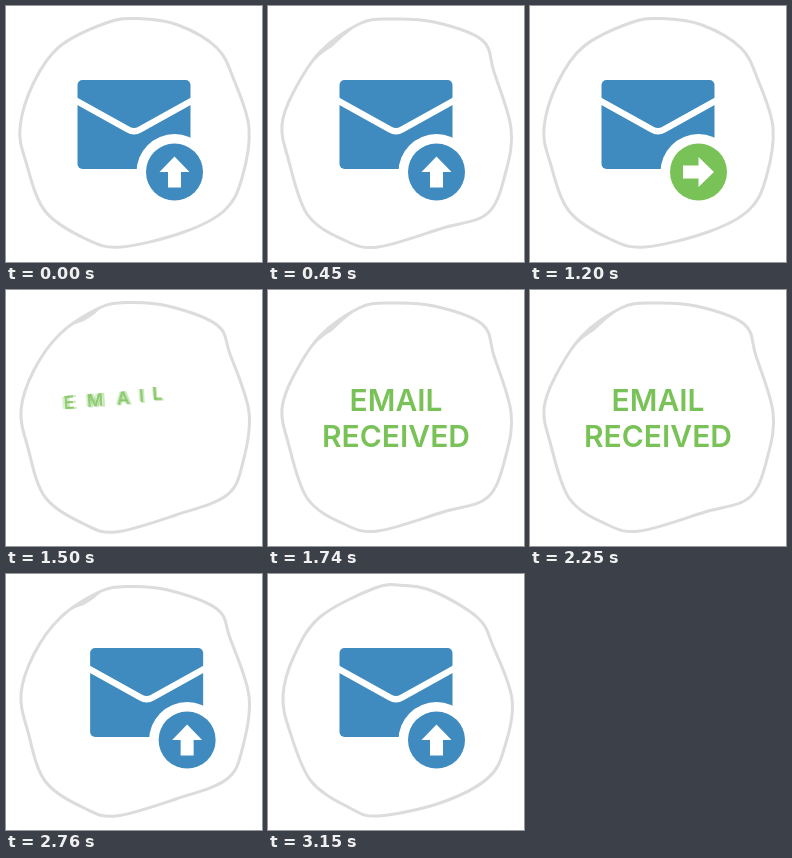
An HTML page that plays this animation: 256 px wide and 256 px high, repeating every 3270 ms.

```html
<!DOCTYPE html>
<html lang="en">
<head>
<meta charset="utf-8">
<title>Email received</title>
<style>
  html, body { margin: 0; width: 100%; height: 100%; overflow: hidden; background: #fff; }
  svg { display: block; width: 100%; height: 100%; }
  text { font: 600 30px Inter, Arial, sans-serif; fill: #79c257; text-anchor: middle; }
</style>
</head>
<body>
<svg id="stage" viewBox="0 0 256 256">
  <mask id="cutout" maskUnits="userSpaceOnUse" x="60" y="60" width="140" height="140">
    <rect x="71.5" y="74" width="113" height="89" rx="5" fill="#fff"/>
    <path d="M68 93.5L122 123.5Q128 127 134 123.5L188 93.5" fill="none" stroke="#000" stroke-width="6.5"/>
    <circle cx="168.5" cy="166" r="38"/>
  </mask>
  <path id="outline" fill="none" stroke="#dcdcdc" stroke-width="3"/>
  <path id="swell" fill="#dcdcdc"/>
  <g id="envelope">
    <rect x="60" y="60" width="140" height="140" fill="#3f8bbf" mask="url(#cutout)"/>
    <circle id="badge" cx="168.5" cy="166" r="28.5"/>
    <path id="arrow" d="M168.5 150.5L183.5 166H175V181.5H162V166H153.5Z" fill="#fff"/>
  </g>
  <g id="words"></g>
</svg>
<script>
const LOOP = 3270, STEP = 30, WOBBLE = 150;
const BLUE = [63, 139, 191], GREEN = [121, 194, 87];
const $ = id => document.getElementById(id);

// Four hand-drawn rings, shown in turn
const rings = [
  [14,122, 27,78, 53,41, 100,17, 132,12.5, 172,19, 211,42, 228,74, 243,122, 236,172, 219,204, 178,226, 115,241, 80,233, 39,205, 20,156],
  [15,122, 26,82, 52,43, 107,14, 135,11.5, 167,18, 210,44, 225,72, 244,125, 237,172, 220,204, 172,229, 110,242, 82,234, 43,207, 22,158],
  [15,120, 28,80, 54,44, 93,18, 122,12.5, 162,16, 211,35, 224,64, 243,122, 237,172, 221,205, 170,225, 110,242, 78,234, 39,207, 22,158],
  [14,119, 25,87, 52,46, 91,18, 122,13, 166,16, 214,34, 226,66, 243,122, 238,165, 220,207, 175,222, 110,241, 76,234, 39,208, 20,152]
];
const swells = ["", "", "M49 48Q60 36 78 31Q90 24 97 16Q78 25 68 33Q56 38 49 48Z",
  "M45 56Q55 46 64 41Q74 31 87 21Q68 29 61 37Q52 43 45 56Z"];

// Closed Catmull-Rom curve through flat x, y pairs
function smoothPath(p) {
  const n = p.length, at = i => p[(i + n) % n];
  let d = `M${p[0]} ${p[1]}`;
  for (let i = 0; i < n; i += 2) {
    const c = [0, 1].map(k => at(i + k) + (at(i + 2 + k) - at(i - 2 + k)) / 6);
    const e = [0, 1].map(k => at(i + 2 + k) - (at(i + 4 + k) - at(i + k)) / 6);
    d += `C${c} ${e} ${at(i + 2)} ${at(i + 3)}`;
  }
  return d + "Z";
}
const ringPaths = rings.map(smoothPath);

const progress = (t, from, to) => Math.min(1, Math.max(0, (t - from) / (to - from)));
const easeIn = x => x * x;
const easeOut = x => 1 - (1 - x) ** 2;
const easeInOut = x => x < .5 ? 2 * x * x : 1 - 2 * (1 - x) ** 2;

function addText(content) {
  const el = document.createElementNS("http://www.w3.org/2000/svg", "text");
  el.textContent = content;
  $("words").append(el);
  return el;
}

// Split a centred word into letters, each with a few lagging copies for blur
function makeWord(word, baseline, start, end) {
  const probe = addText(word);
  probe.setAttribute("x", 128);
  const centers = [...word].map((_, i) =>
    (probe.getStartPositionOfChar(i).x + probe.getEndPositionOfChar(i).x) / 2);
  probe.remove();
  return [...word].flatMap((char, i) => [-10, 10, 0].map(lag =>
    ({ el: addText(char), x: centers[i], i, lag, baseline, start, end })));
}
const letters = [...makeWord("EMAIL", 121, 1440, 1710), ...makeWord("RECEIVED", 157, 1500, 1740)];

function drawLetter({ el, x, i, lag, baseline, start, end }, t) {
  const away = time => time < 2200
    ? 1 - easeOut(progress(time, start, end))
    : easeIn(progress(time, 2400, 2580));
  const q = away(t + lag);
  const hidden = away(t) === 1 || (lag && away(t) === 0);
  el.setAttribute("opacity", hidden ? 0 : Math.min(1, (1 - q) * 2) * (lag ? .4 : 1));
  const dx = q * (5.4 * i - 45), dy = q * (-3.7 * i - 3.5);
  el.setAttribute("transform",
    `translate(${x + dx} ${baseline + dy}) rotate(${-7 * q}) scale(${1 - .66 * q})`);
}

function draw(t) {
  const ring = Math.floor(t / WOBBLE) % rings.length;
  $("outline").setAttribute("d", ringPaths[ring]);
  $("swell").setAttribute("d", swells[ring]);

  const arriving = t >= 2000;
  const shift = arriving
    ? 256 * (1 - easeOut(progress(t, 2550, 2820)))
    : 200 * easeIn(progress(t, 1200, 1440));
  $("envelope").setAttribute("transform", `translate(${shift} 0)`);

  const spin = arriving ? 0 : 450 * easeInOut(progress(t, 720, 960));
  const tint = arriving ? 0 : progress(t, 870, 990);
  $("arrow").setAttribute("transform", `rotate(${spin} 168.5 166)`);
  $("badge").setAttribute("fill", `rgb(${BLUE.map((c, k) => Math.round(c + (GREEN[k] - c) * tint))})`);

  letters.forEach(letter => drawLetter(letter, t));
}

const origin = performance.now();
function tick() {
  const t = (performance.now() - origin) % LOOP;
  draw(Math.floor(t / STEP) * STEP);
  requestAnimationFrame(tick);
}
tick();
</script>
</body>
</html>
```
